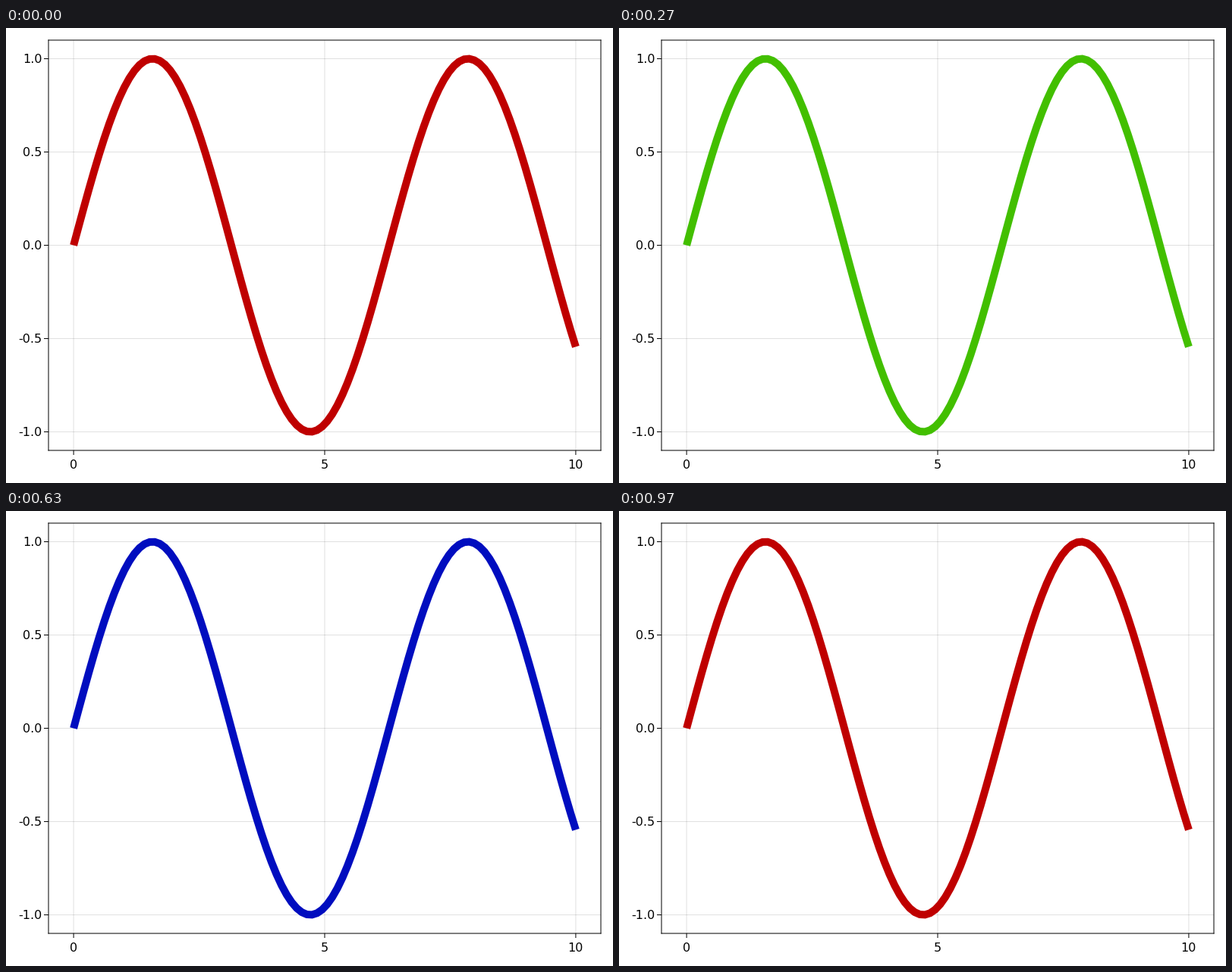
These frames come from a looping animation (800x600 px, 1.01 s). A matplotlib script:

```python
import colorsys

import matplotlib.pyplot as plt
import numpy as np
from matplotlib.animation import FuncAnimation

WIDTH, HEIGHT, DPI = 800, 600, 100
PX = 72 / DPI  # points per pixel
LEFT, RIGHT, TOP, BOTTOM = 56, 784, 16, 557
TICK = 6
MARGIN = 0.05
COLORS = 30
STEP_MS, STEPS = 10, 101

fig = plt.figure(figsize=(WIDTH / DPI, HEIGHT / DPI), dpi=DPI, facecolor="white")
ax = fig.add_axes([0, 0, 1, 1])
ax.set(xlim=(0, WIDTH), ylim=(HEIGHT, 0))
ax.axis("off")

x = np.linspace(0, 10, 100)
y = np.sin(x)


def scale(values, data, start, end):
    """Map data to pixels, leaving a margin on both sides."""
    pad = MARGIN * np.ptp(data)
    low, high = data.min() - pad, data.max() + pad
    return start + (values - low) / (high - low) * (end - start)


def to_x(values):
    return scale(values, x, LEFT, RIGHT)


def to_y(values):
    return scale(values, y, BOTTOM, TOP)


def stroke(xs, ys, width=1, **style):
    line, = ax.plot(xs, ys, lw=width * PX, solid_capstyle="butt",
                    solid_joinstyle="miter", snap=False, **style)
    return line


def label(px, py, text, align):
    ax.text(px, py, text, ha=align, va="baseline", color="black",
            family="DejaVu Sans", size=16 * PX)


GRID = dict(color="black", alpha=0.12, zorder=1)
FRAME = dict(color="black", zorder=3)

for value in (0, 5, 10):
    px = to_x(value)
    stroke([px, px], [TOP, BOTTOM], **GRID)
    stroke([px, px], [BOTTOM, BOTTOM + TICK], **FRAME)
    label(px, 581, str(value), "center")

for value in (-1.0, -0.5, 0.0, 0.5, 1.0):
    py = to_y(value)
    stroke([LEFT, RIGHT], [py, py], **GRID)
    stroke([LEFT - TICK, LEFT], [py, py], **FRAME)
    label(47.5, py + 5.8, f"{value:.1f}", "right")

for side in (LEFT, RIGHT):
    stroke([side, side], [TOP - 0.5, BOTTOM + 0.5], **FRAME)
for side in (TOP, BOTTOM):
    stroke([LEFT - 0.5, RIGHT + 0.5], [side, side], **FRAME)

wave = stroke(to_x(x), to_y(y), width=10, zorder=2)


def update(step):
    # Thirty colours per second; the last one holds until the loop ends.
    index = min(int((step + 0.5) * STEP_MS * COLORS / 1000), COLORS - 1)
    wave.set_color(colorsys.hsv_to_rgb(index / (COLORS - 1), 1, 0.75))
    return wave,


anim = FuncAnimation(fig, update, frames=STEPS, interval=STEP_MS,
                     repeat=True, repeat_delay=0)
plt.show()
```
